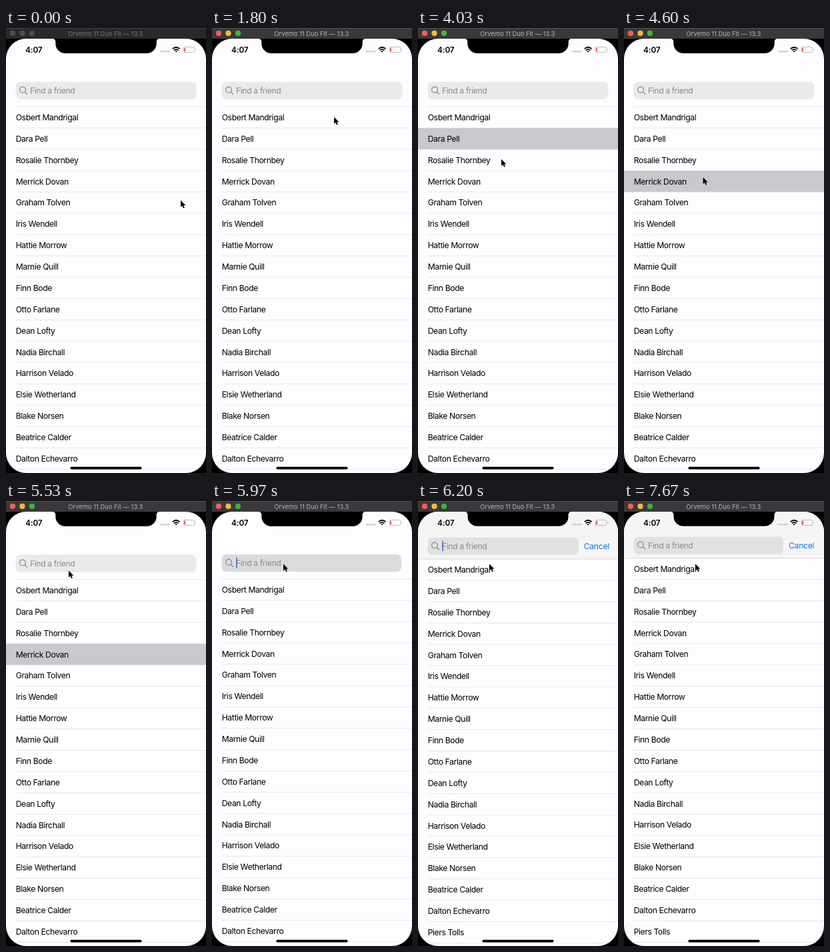
Animation, 300 px wide and 665 px high, one loop 8000 ms. Source, as an HTML page:

```html
<!DOCTYPE html>
<html lang="en">
<head>
<meta charset="utf-8">
<title>Friend search</title>
<style>
  html, body { margin: 0; width: 100%; height: 100%; overflow: hidden; background: #000; }
  svg { display: block; width: 100%; height: 100%; }
  text { font-family: Inter, Roboto, "Liberation Sans", sans-serif; font-size: 12.2px; letter-spacing: -.4px; }
  #title { font-size: 9.4px; letter-spacing: 0; }
  #clock { font-size: 11.8px; font-weight: 600; letter-spacing: -.1px; }
  #cancel { letter-spacing: -.3px; }
</style>
</head>
<body>
<svg viewBox="0 0 300 665">
  <defs>
    <clipPath id="screen">
      <path d="M30 16H70A4.3 4.3 0 0 1 74.3 20.3V23.2A14.5 14.5 0 0 0 88.8 37.7H211.2A14.5 14.5 0 0 0 225.7 23.2V20.3A4.3 4.3 0 0 1 230 16H270A30 30 0 0 1 300 46V635A30 30 0 0 1 270 665H30A30 30 0 0 1 0 635V46A30 30 0 0 1 30 16Z"/>
    </clipPath>
  </defs>
  <rect width="300" height="665"/>

  <rect id="titleBar" width="300" height="16"/>
  <rect width="300" height=".8" fill="#fff" opacity=".15"/>
  <g id="lights"></g>
  <text id="title" x="149.3" y="11.6" text-anchor="middle">Orvemo 11 Duo Fit — 13.3</text>

  <g clip-path="url(#screen)">
    <rect y="16" width="300" height="649" fill="#fdfcfe"/>
    <g id="list">
      <rect id="highlight" width="300" fill="#c9c8ce"/>
      <g id="rows"></g>
    </g>
    <rect id="navBar" y="16" width="300" fill="#f5f5f6"/>
    <path id="navLine" d="M0 0H300" stroke="#cfcfd1" stroke-width=".7"/>

    <g id="search">
      <rect id="field" x="14.5" y="80.5" height="26" rx="7"/>
      <g fill="none" stroke="#85858a" stroke-width="1.2" stroke-linecap="round">
        <circle cx="25" cy="92.3" r="4.4"/>
        <path d="M28.3 95.6L31.6 98.8"/>
      </g>
      <text x="36" y="97.6" fill="#8b8b8f">Find a friend</text>
      <rect id="caret" x="36.2" y="85.2" width="1.5" height="16" rx=".7" fill="#4263dc"/>
      <text id="cancel" y="97.6" fill="#0a78f5">Cancel</text>
    </g>

    <text id="clock" x="29" y="36.6">4:07</text>
    <g fill="#c3c3c6">
      <circle cx="232.8" cy="35.2" r="1.4"/>
      <circle cx="236.5" cy="35.2" r="1.4"/>
      <circle cx="240.2" cy="35.2" r="1.4"/>
      <circle cx="243.9" cy="35.2" r="1.4"/>
    </g>
    <g fill="none" stroke="#000" stroke-width="1.8">
      <path d="M249.8 31.2Q255.2 26.2 260.6 31.2"/>
      <path d="M251.8 33.4Q255.2 30.3 258.6 33.4"/>
      <path d="M253.6 34.7Q255.2 33.4 256.8 34.7L255.2 36.6Z" fill="#000" stroke="none"/>
    </g>
    <rect x="266" y="28.4" width="17" height="8" rx="2.4" fill="none" stroke="#b4b4b7" stroke-width=".9"/>
    <rect x="267.2" y="29.6" width="1.8" height="5.6" rx=".8" fill="#f0433a"/>
    <path d="M284 31Q285.5 32.4 284 33.8Z" fill="#b4b4b7"/>
    <rect x="96.4" y="655.8" width="107.2" height="3.7" rx="1.8"/>
  </g>

  <path id="cursor" d="M0 0V10.2L2.4 8.1L4 11.8L5.9 11L4.3 7.4H7.4Z" stroke="#fff" stroke-width=".8" paint-order="stroke"/>
</svg>
<script>
const LOOP = 8000, ROW = 31.875, LIST_TOP = 117.5, SHIFT = 32;
const FOCUS_AT = 1800, SEARCH_AT = 5940, SEARCH_TIME = 295;
const friends = [
  'Osbert Mandrigal', 'Dara Pell', 'Rosalie Thornbey', 'Merrick Dovan', 'Graham Tolven',
  'Iris Wendell', 'Hattie Morrow', 'Marnie Quill', 'Finn Bode', 'Otto Farlane',
  'Dean Lofty', 'Nadia Birchall', 'Harrison Velado', 'Elsie Wetherland', 'Blake Norsen',
  'Beatrice Calder', 'Dalton Echevarro', 'Piers Tolls'
];
const lightColors = ['#fc5b54', '#f5bb35', '#35b93c'];

// [start, end, x, y]: the pointer travels to x, y between start and end.
const moves = [
  [0, 0, 262, 257.5],
  [290, 400, 212, 142],
  [720, 900, 183, 133],
  [2980, 3430, 127, 170],
  [3790, 4030, 125, 196],
  [4290, 4560, 118.5, 223],
  [4880, 5130, 66, 133],
  [5260, 5530, 94, 104],
  [5530, 5730, 107, 94]
];
// [time, selected row]
const selections = [[1930, 0], [3570, 1], [4120, 2], [4580, 3], [SEARCH_AT, -1]];

const $ = id => document.getElementById(id);
const set = (node, attrs) => {
  for (const key in attrs) node.setAttribute(key, attrs[key]);
  return node;
};
const add = (parent, tag, attrs) =>
  parent.appendChild(set(document.createElementNS('http://www.w3.org/2000/svg', tag), attrs));
const ramp = (t, from, to) => Math.min(1, Math.max(0, (t - from) / (to - from || 1)));
const smooth = p => p * p * (3 - 2 * p);

const lights = lightColors.map((_, i) => add($('lights'), 'circle', { cx: 10 + 14.5 * i, cy: 7.9, r: 4.1 }));

const addSeparator = y => add($('rows'), 'path', { d: `M14.5 ${y}H300`, stroke: '#dedee1', 'stroke-width': .7 });
friends.forEach((name, i) => {
  const top = LIST_TOP + ROW * i;
  addSeparator(top);
  add($('rows'), 'text', { x: 14.7, y: top + 20.4 }).textContent = name;
});
addSeparator(LIST_TOP + ROW * friends.length);
set($('highlight'), { height: ROW + .2 });

function pointerAt(t) {
  let [, , x, y] = moves[0];
  for (const [start, end, toX, toY] of moves.slice(1)) {
    const p = smooth(ramp(t, start, end));
    x += (toX - x) * p;
    y += (toY - y) * p;
  }
  return [x, y];
}

function caretOpacity(t) {
  if (t < SEARCH_AT + 20) return 0;
  return 1 - ramp(t, 6470, 6700) + ramp(t, 6970, 7200) - ramp(t, 7450, 7660);
}

function drawWindow(t) {
  const focused = t >= FOCUS_AT;
  set($('titleBar'), { fill: focused ? '#39383b' : '#29282b' });
  set($('title'), { fill: focused ? '#b4b3b6' : '#777679' });
  lights.forEach((light, i) => set(light, { fill: focused ? lightColors[i] : '#4d4c4f' }));
}

function drawList(t, shift) {
  const [, row] = selections.filter(([time]) => t >= time).pop() || [0, -1];
  set($('highlight'), { y: LIST_TOP + ROW * row, visibility: row < 0 ? 'hidden' : 'visible' });
  set($('list'), { transform: `translate(0 ${-shift})` });
}

function drawSearch(t, open, shift) {
  const right = 285.5 - 46.5 * open, bottom = LIST_TOP - shift;
  const gray = open > 0 ? 219 + 6 * open : 234;
  set($('navBar'), { height: bottom - 16, opacity: open });
  set($('navLine'), { transform: `translate(0 ${bottom})`, opacity: open });
  set($('search'), { transform: `translate(0 ${-shift * 27 / SHIFT})` });
  set($('field'), { width: right - 14.5, fill: `rgb(${gray},${gray},${gray + 1})` });
  set($('cancel'), { x: right + 8, opacity: Math.min(1, open * 1.15) });
  set($('caret'), { opacity: caretOpacity(t) });
}

function draw(t) {
  const open = smooth(ramp(t, SEARCH_AT, SEARCH_AT + SEARCH_TIME));
  const shift = SHIFT * open;
  drawWindow(t);
  drawList(t, shift);
  drawSearch(t, open, shift);
  set($('cursor'), { transform: `translate(${pointerAt(t)})` });
}

const began = performance.now();
function tick() {
  draw((performance.now() - began) % LOOP);
  requestAnimationFrame(tick);
}
tick();
</script>
</body>
</html>
```
